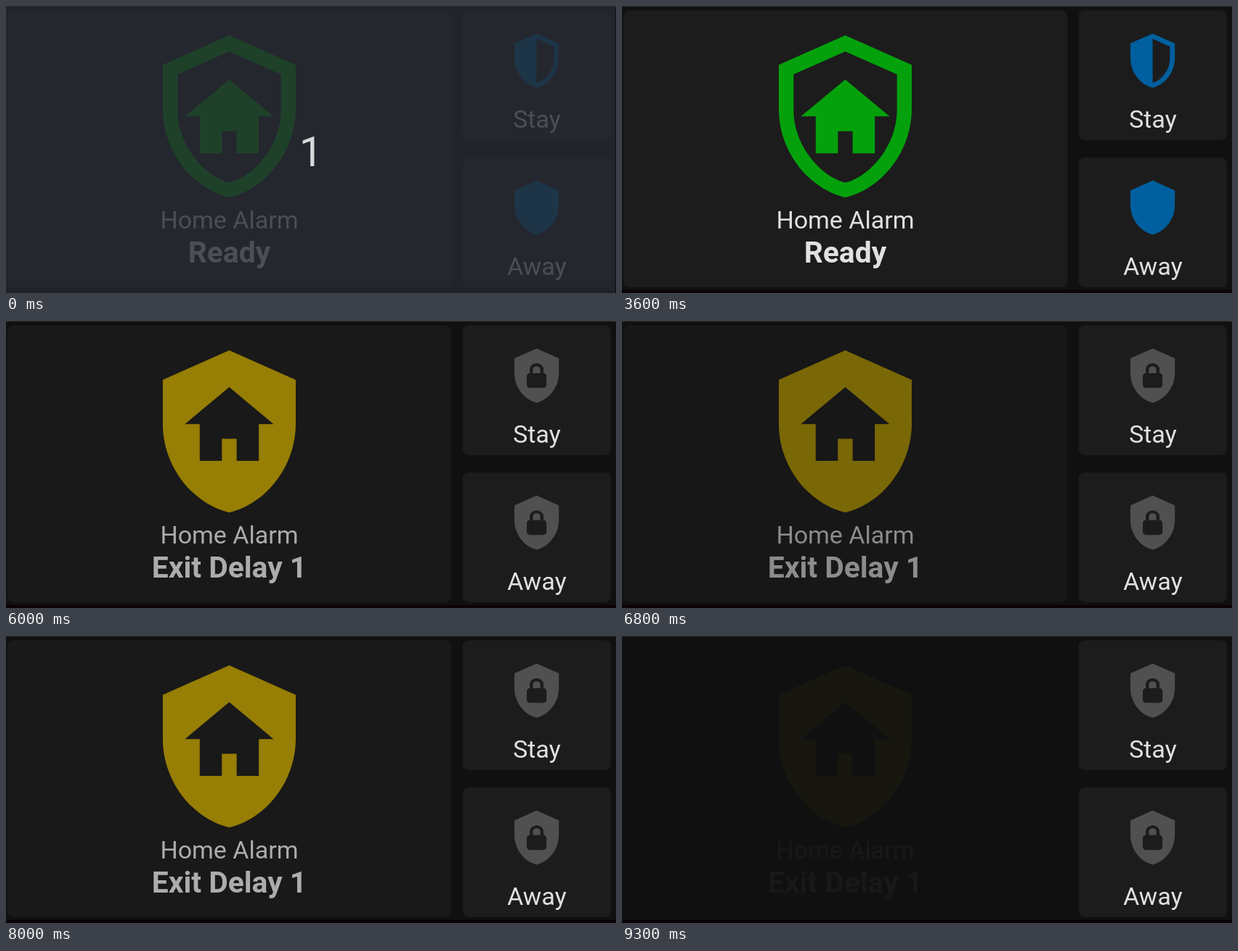
Recreate the animation shown at these times as an HTML page. Size 840 px wide and 396 px high, loop 9600 ms.

```html
<!DOCTYPE html>
<html lang="en">
<head>
<meta charset="utf-8">
<title>Home alarm panel</title>
<style>
  html, body { margin: 0; width: 100%; height: 100%; overflow: hidden; background: #101010; }
  svg { display: block; }
  text { font: 34px Roboto, sans-serif; fill: #e1e1e1; text-anchor: middle; }
  #state { font-size: 40.8px; font-weight: 700; }
  #digit { font-size: 58px; fill: #d9d9da; }
  .card { fill: #1c1c1c; }
  path { fill-rule: evenodd; }
</style>
</head>
<body>
<svg width="840" height="396" viewBox="0 0 840 396">
  <rect width="840" height="396" fill="#101010"/>
  <rect width="840" height="1" fill="#2c2c2c"/>
  <rect y="392" width="840" height="4" fill="#0a0307"/>
  <g id="panel">
    <rect class="card" x="2" y="6" width="611" height="382" rx="8"/>
    <path id="home" transform="translate(185.4 30.3) scale(10.17)"/>
    <text x="307.5" y="307">Home Alarm</text>
    <text id="state" x="307.5" y="354"></text>
  </g>
  <rect class="card" x="629" y="6" width="204" height="179" rx="8"/>
  <path id="stay" transform="translate(689.9 34.5) scale(3.4)"/>
  <text x="731" y="168">Stay</text>
  <rect class="card" x="629" y="209" width="204" height="179" rx="8"/>
  <path id="away" transform="translate(689.9 237.4) scale(3.4)"/>
  <text x="731" y="371">Away</text>
  <g id="countdown">
    <rect y="1" width="839" height="395" fill="#262a33" fill-opacity=".8"/>
    <text id="digit" x="420" y="221">1</text>
  </g>
</svg>
<script>
const $ = id => document.getElementById(id);

const shield = 'M12,1L21,5V11C21,16.55 17.16,21.74 12,23C6.84,21.74 3,16.55 3,11V5Z';
const innerRight = 'M12,21C15.75,20 19,15.54 19,11.22V6.3L12,3.18';
const house = top => `M12,${top}l6,5h-2v5h-3v-3h-2v3h-3v-5h-2Z`;
const icons = {
  outline: shield + innerRight + 'L5,6.3V11.22C5,15.54 8.25,20 12,21Z' + house(7),
  filled: shield + house(6),
  half: shield + innerRight + 'Z',
  shield,
  lock: shield +
    'M12,7C13.4,7 14.8,8.1 14.8,9.5V11C15.4,11 16,11.6 16,12.3V15.8C16,16.4 15.4,17 14.7,17' +
    'H9.2C8.6,17 8,16.4 8,15.7V12.2C8,11.6 8.6,11 9.2,11V9.5C9.2,8.1 10.6,7 12,7Z' +
    'M12,8.2C11.2,8.2 10.5,8.7 10.5,9.5V11H13.5V9.5C13.5,8.7 12.8,8.2 12,8.2Z'
};

const yellow = '#c4a300', green = '#04a10c', blue = '#005f9e', grey = '#505050';
const ready = { text: 'Ready', home: ['outline', green], stay: ['half', blue], away: ['shield', blue] };
const notReady = { text: 'Not Ready', home: ['outline', yellow], stay: ['half', grey], away: ['shield', grey] };
const exiting = { text: 'Exit Delay 1', home: ['filled', yellow], stay: ['lock', grey], away: ['lock', grey] };

const LOOP = 9600, STEP = 100, EXIT = 5500, BLINK = 5550, HALF = 1000;

// The CSS "ease" curve, cubic-bezier(.25, .1, .25, 1)
function ease(x) {
  const bezier = (u, a, b) => 3 * u * (1 - u) ** 2 * a + 3 * u * u * (1 - u) * b + u ** 3;
  let lo = 0, hi = 1;
  for (let i = 0; i < 24; i++) {
    const mid = (lo + hi) / 2;
    if (bezier(mid, .25, .25) < x) lo = mid; else hi = mid;
  }
  return bezier(lo, .1, 1);
}

function blink(t) {
  if (t < BLINK) return 0;
  const phase = (t - BLINK) / HALF % 2;
  return phase < 1 ? ease(phase) : 1 - ease(phase - 1);
}

function show(state) {
  $('state').textContent = state.text;
  for (const id of ['home', 'stay', 'away']) {
    const [icon, color] = state[id];
    $(id).setAttribute('d', icons[icon]);
    $(id).setAttribute('fill', color);
  }
}

let current;
function draw() {
  const t = Math.floor(performance.now() % LOOP / STEP) * STEP;
  const state = t >= EXIT ? exiting : t >= 1900 && t < 3600 ? notReady : ready;
  if (state !== current) show(current = state);
  $('panel').setAttribute('opacity', t < EXIT ? 1 : blink(t));
  $('countdown').setAttribute('visibility', t < 100 ? 'visible' : 'hidden');
  requestAnimationFrame(draw);
}
draw();
</script>
</body>
</html>
```
